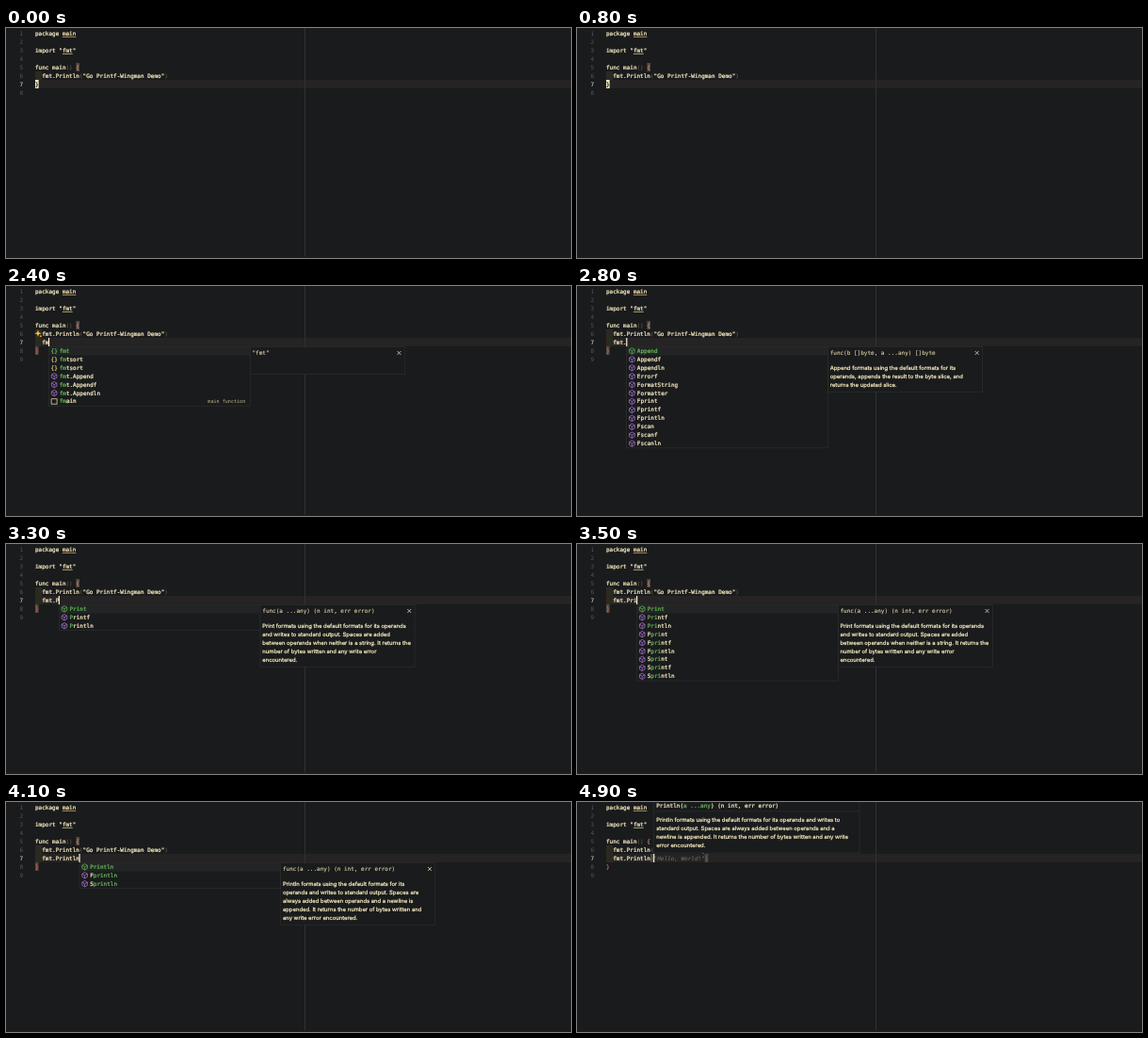
An HTML page that plays this animation: 600 by 244 pixels, repeating every 5 s.

```html
<!DOCTYPE html>
<html lang="en">
<head>
<meta charset="utf-8">
<title>Editor completion</title>
<style>
  html, body { margin: 0; width: 100%; height: 100%; overflow: hidden; background: #1a1b1c; }
  svg { display: block; width: 600px; height: 244px; }
  text {
    font: 6px "DejaVu Sans Mono", monospace;
    color: #f6ebc0;
    white-space: pre;
    text-rendering: geometricPrecision;
  }
  text, tspan { fill: currentColor; stroke: currentColor; stroke-width: .24px; }
  .doc { font: 5.9px Inter, sans-serif; }
  .num { color: #55565a; text-anchor: end; stroke: none; }
  .on { color: #f4f4ee; }
  .paren { color: #75675a; stroke: none; }
  .brace { color: #c08866; }
  .close { color: #b8604c; }
  .dark { color: #1a1b1c; }
  .hit { color: #62b558; }
  .head { color: #e3d8b0; stroke-width: .08px; }
  .ghost { color: #77776f; font-style: italic; stroke: none; }
  .detail { font-size: 5.1px; color: #c3bb98; text-anchor: end; stroke: none; }
  .icon { fill: none; stroke-width: .75; }
  .box { fill: #1a1b1c; stroke: #303133; stroke-width: .6; }
</style>
</head>
<body>
<svg id="stage" viewBox="0 0 600 244"></svg>
<script>
const LOOP = 5000, CW = 3.612, LH = 9, ROW = 8.93, LEFT = 31;
const stage = document.getElementById('stage');
const layers = [];

const col = n => LEFT + n * CW;
const lineTop = line => 1 + (line - 1) * LH;
const base = line => lineTop(line) + 6.7;
const rect = (x, y, w, h, fill) => `<rect x="${x}" y="${y}" width="${w}" height="${h}" fill="${fill}"/>`;
const box = (x, y, w, h) => `<rect class="box" x="${x}" y="${y}" width="${w}" height="${h}"/>`;
const text = (x, y, s, cls = '') => `<text x="${x}" y="${y}" class="${cls}">${s}</text>`;
const code = (line, c, s, cls) => text(col(c), base(line), s, cls);
const mark = (line, c, fill = '#544843') => rect(col(c), lineTop(line), CW, LH, fill);
const indent = line => rect(LEFT, lineTop(line), 2 * CW, LH, '#2b2a21');
const current = line => rect(LEFT, lineTop(line), 600 - LEFT, LH, '#262324') + text(18, base(line), line, 'num on');
const caret = c => rect(col(c) - .5, lineTop(7), 1.2, LH, '#fbf3cf');
const block = (line, s = '') => mark(line, 0, '#f1e8bc') + code(line, 0, s, 'dark');

// Shows the markup during each [from, to) span.
function layer(spans, markup) {
  const g = document.createElementNS('http://www.w3.org/2000/svg', 'g');
  g.innerHTML = markup;
  stage.append(g);
  layers.push({ g, spans });
}

function icon(kind, x, y, selected) {
  const stroke = selected ? '#62b558' : kind === '*' ? '#a774d6' : '#e6dfbd';
  if (kind === '{') return `<text x="${x - 3.6}" y="${y + 2}" style="color:${selected ? stroke : '#d9c27c'}">{}</text>`;
  const d = kind === '#'
    ? 'M-3-2.8H3V2.8H-3Z'
    : 'M0-3.2L2.8-1.6V1.6L0 3.2L-2.8 1.6V-1.6ZM-2.8-1.6L0 0L2.8-1.6M0 0V3.2';
  return `<path class="icon" transform="translate(${x} ${y})" stroke="${stroke}" d="${d}"/>`;
}

function label(s, match, selected) {
  const i = s.toLowerCase().indexOf(match.toLowerCase());
  const end = i + match.length;
  if (selected) return `<tspan class="hit">${s}</tspan>`;
  if (!match || i < 0) return s;
  return s.slice(0, i) + `<tspan class="hit">${s.slice(i, end)}</tspan>` + s.slice(end);
}

// Each item starts with its kind: { package, * function, # snippet.
function popup(typed, items, match, head, body) {
  const x = col(2 + typed.length), y = 64.7, w = 213.8;
  let out = box(x, y, w, items.length * ROW) + rect(x + .3, y + .3, w - .6, ROW - .3, '#222425');
  items.forEach((item, i) => {
    const cy = y + 4.2 + i * ROW, s = item.slice(1);
    out += icon(item[0], x + 5.7, cy, !i) + text(x + 11.2, cy + 2, label(s, match, !i));
    if (s === 'fmain') out += text(x + w - 5, cy + 1.8, 'main function', 'detail');
  });
  const dx = x + w, tx = dx + 2.2, r = dx + 164;
  out += box(dx, y, 164, body.length ? 20.5 + body.length * LH : 29);
  out += text(tx, 73, head, 'head');
  out += `<path class="icon" stroke="#e6dfbd" d="M${r - 7.8} 69l4 4m0-4l-4 4"/>`;
  body.forEach((s, i) => out += text(tx, 89.4 + i * LH, s, 'doc'));
  return out;
}

// Fixed parts
layer([[0, LOOP]], rect(0, 0, 600, 244, '#1a1b1c') + rect(0, 242.6, 600, 1.4, '#261a1c'));
layer([[0, 1000]], current(7));
layer([[1000, 1900]], current(6));
layer([[1900, LOOP]], current(7) + indent(7));

let page = rect(317, 0, 1, 242.6, '#303133') + indent(6);
for (let n = 1; n <= 5; n++) page += text(18, base(n), n, 'num');
page += code(1, 0, 'package main') + code(3, 0, 'import "fmt"') + code(5, 0, 'func main')
  + rect(col(8), 9, 4 * CW, .8, '#c9a35c') + rect(col(8), 27, 3 * CW, .8, '#c5b98c')
  + code(5, 9, '()', 'paren')
  + code(6, 2, 'fmt.Println') + code(6, 13, '(', 'paren')
  + code(6, 14, '"Go Printf-Wingman Demo"') + code(6, 38, ')', 'paren')
  + text(18, base(8), 8, 'num');
layer([[0, LOOP]], page);
layer([[0, 1000], [1900, LOOP]], text(18, base(6), 6, 'num'));
layer([[1000, 1900]], text(18, base(7), 7, 'num'));
layer([[1900, LOOP]], text(18, base(9), 9, 'num'));

// Braces and block cursor
layer([[0, 4900]], mark(5, 12));
layer([[0, LOOP]], code(5, 12, '{', 'brace'));
layer([[0, 1900]], mark(7, 0) + code(7, 0, '}', 'close'));
layer([[1900, 4900]], mark(8, 0));
layer([[1900, LOOP]], code(8, 0, '}', 'close'));
layer([[0, 300], [800, 1000]], block(7, '}'));
layer([[1000, 1500]], block(6));

// Sparkle hint beside the line above
layer([[2200, 2600]],
  '<path fill="#f2b53a" d="M34 46.6l1 2.7 2.7 1-2.7 1-1 2.7-1-2.7-2.7-1 2.7-1z"/>'
  + '<circle cx="36.9" cy="53.2" r=".9" fill="#f2b53a"/>');

// Typed text and suggestions
const printSig = 'func(a ...any) (n int, err error)';
const printDoc = [
  'Print formats using the default formats for its operands',
  'and writes to standard output. Spaces are added',
  'between operands when neither is a string. It returns the',
  'number of bytes written and any write error',
  'encountered.'
];
const printlnDoc = [
  'Println formats using the default formats for its',
  'operands and writes to standard output. Spaces are',
  'always added between operands and a newline is',
  'appended. It returns the number of bytes written and',
  'any write error encountered.'
];
const appendDoc = [
  'Append formats using the default formats for its',
  'operands, appends the result to the byte slice, and',
  'returns the updated slice.'
];
const list = (kind, names) => names.split(' ').map(n => kind + n);
const appends = list('*', 'fmt.Append fmt.Appendf fmt.Appendln');
const pkgs = [...list('{', 'fmt fmtsort fmtsort'), ...appends];
const prints = list('*', 'Print Printf Println');
const allPrints = [...prints, ...list('*', 'Fprint Fprintf Fprintln Sprint Sprintf Sprintln')];
const lns = list('*', 'Println Fprintln Sprintln');
const members = list('*', 'Append Appendf Appendln Errorf FormatString Formatter Fprint Fprintf Fprintln Fscan Fscanf Fscanln');
const fNames = [...list('{', 'fmt flag filepath fs fnv fcgi fstest fmtsort'), ...appends, '#fmain'];

const steps = [
  [1900, ''],
  [2200, 'f', fNames, '"fmt"', []],
  [2400, 'fm', [...pkgs, '#fmain'], '"fmt"', []],
  [2600, 'fmt', pkgs, '"fmt"', []],
  [2800, 'fmt.', members, 'func(b []byte, a ...any) []byte', appendDoc],
  [3100, 'fmt.P', prints, printSig, printDoc],
  [3400, 'fmt.Pr', allPrints, printSig, printDoc],
  [3500, 'fmt.Pri', allPrints, printSig, printDoc],
  [3600, 'fmt.Prin', allPrints, printSig, printDoc],
  [3700, 'fmt.Print', allPrints, printSig, printDoc],
  [4000, 'fmt.Printl', lns, printSig, printlnDoc],
  [4100, 'fmt.Println', lns, printSig, printlnDoc],
  [4900, '']
];
steps.slice(0, -1).forEach(([from, typed, items, head, body], i) => {
  const to = steps[i + 1][0];
  const match = typed.split('.').pop();
  layer([[from, to]], code(7, 2, typed) + (items ? popup(typed, items, match, head, body) : ''));
  layer([[from, Math.min(to, from + 500)]], caret(2 + typed.length));
});

// Accepted call with signature help and inline hint
const help = [
  'Println formats using the default formats for its operands and writes to',
  'standard output. Spaces are always added between operands and a',
  'newline is appended. It returns the number of bytes written and any write',
  'error encountered.'
];
const hx = col(14);
layer([[4900, LOOP]],
  mark(7, 13, '#4a4640') + mark(7, 29, '#4a4640')
  + code(7, 2, 'fmt.Println') + code(7, 13, '(', 'paren') + code(7, 29, ')', 'paren')
  + code(7, 14, '"Hello, World!"', 'ghost') + caret(14)
  + box(hx, -2, 218.4, 56) + rect(hx, 9.6, 218.4, .6, '#303133')
  + text(hx + 2.6, 6.4, 'Println(<tspan class="hit">a ...any</tspan>) (n int, err error)')
  + help.map((s, i) => text(hx + 2.6, 21.2 + i * 8.9, s, 'doc')).join(''));

function draw() {
  const t = performance.now() % LOOP;
  for (const { g, spans } of layers) {
    const shown = spans.some(([from, to]) => t >= from && t < to);
    g.style.display = shown ? '' : 'none';
  }
  requestAnimationFrame(draw);
}
draw();
</script>
</body>
</html>
```
